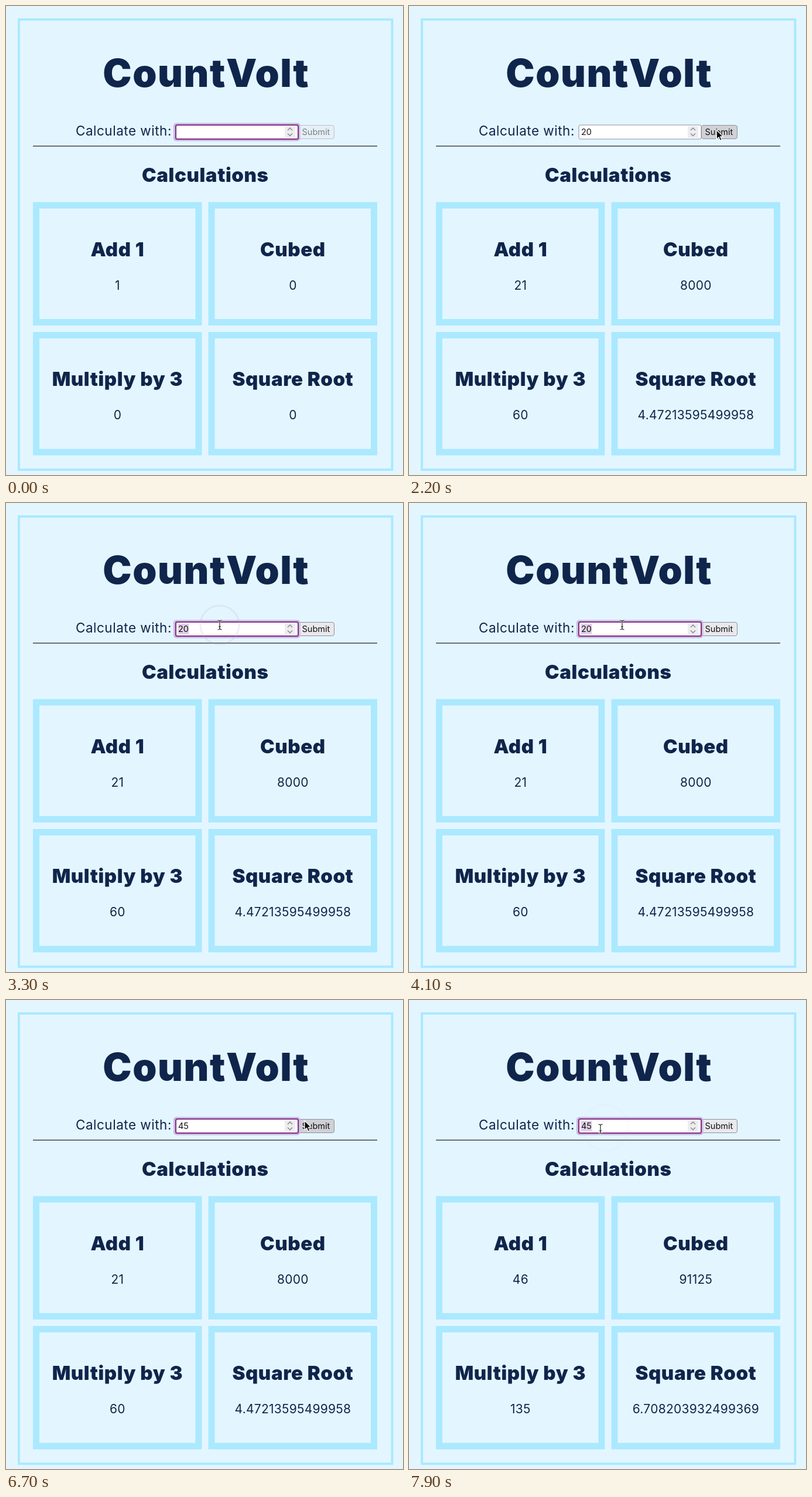
An HTML page that plays this animation: 678x800 px, repeating every 8000 ms.

```html
<!DOCTYPE html>
<html lang="en">
<head>
<meta charset="utf-8">
<title>CountVolt</title>
<style>
  html, body { margin: 0; width: 100%; height: 100%; overflow: hidden; background: #e3f6ff; }
  svg { display: block; width: 678px; height: 800px; }
  text { font-family: Inter, "Open Sans", sans-serif; fill: #10254b; }
  .head { font-weight: 900; font-size: 33px; letter-spacing: 0.6px; text-anchor: middle; }
  .title { font-size: 66px; letter-spacing: 1.6px; }
  .label { font-size: 22.5px; letter-spacing: 0.5px; }
  .value { font-size: 21px; letter-spacing: 0.25px; text-anchor: middle; }
  .field { font-size: 14.5px; fill: #111; }
  .frame { fill: none; stroke: #abe9ff; }
</style>
</head>
<body>
<svg id="stage" viewBox="0 0 678 800">
  <rect width="678" height="800" fill="#e3f6ff"/>
  <rect class="frame" x="22" y="23" width="637.5" height="768" stroke-width="4"/>
  <text class="head title" x="341.8" y="138">CountVolt</text>
  <text class="label" x="119" y="221">Calculate with:</text>
  <rect x="46" y="238" width="588" height="2" fill="#6d6f7a"/>
  <text class="head" x="340.3" y="300">Calculations</text>
  <g id="cards"></g>

  <g id="button">
    <rect id="face" x="499.5" y="203.5" width="61" height="23" rx="3.5" stroke="#8f8f9d"/>
    <text class="field" x="505.5" y="220">Submit</text>
  </g>
  <rect id="glow" x="286" y="199.5" width="216.5" height="31" rx="5" fill="#c9b9de"/>
  <rect id="input" x="290" y="203" width="209" height="24" rx="2.5" fill="#fff"/>
  <rect id="selection" x="294" y="206" width="18.5" height="18" fill="#e2d1e6"/>
  <text id="typed" class="field" x="294" y="220"></text>
  <rect id="caret" x="312.3" y="206" width="1.2" height="18" fill="#111"/>
  <rect x="476" y="205" width="18" height="20" fill="#ededf0"/>
  <path d="M481 212l4-4 4 4M481 217.5l4 4 4-4" fill="none" stroke="#88888f" stroke-width="1.5"/>

  <g id="rings" fill="none" stroke="#b58fd0" stroke-width="3"></g>
  <path id="arrow" d="M0 0V15.5L3.6 12.2 6.1 18 8.8 16.8 6.3 11.2H11Z" fill="#000" stroke="#fff" stroke-width="1.2"/>
  <g id="beam" fill="none">
    <path d="M-3.5 -8Q0 -8 0 -5.5Q0 -8 3.5 -8M0 -6V6M-3.5 8Q0 8 0 5.5Q0 8 3.5 8M-2 3H2" stroke="#fff" stroke-width="2.4"/>
    <path d="M-3.5 -8Q0 -8 0 -5.5Q0 -8 3.5 -8M0 -6V6M-3.5 8Q0 8 0 5.5Q0 8 3.5 8M-2 3H2" stroke="#111" stroke-width="1.1"/>
  </g>
</svg>
<script>
const LOOP = 8000, STEP = 100;
const $ = id => document.getElementById(id);
const set = (el, attrs) => { for (const k in attrs) el.setAttribute(k, attrs[k]); };
const show = (id, on) => set($(id), { visibility: on ? 'visible' : 'hidden' });

function add(parent, tag, attrs, text = '') {
  const el = document.createElementNS('http://www.w3.org/2000/svg', tag);
  set(el, attrs);
  el.textContent = text;
  return parent.appendChild(el);
}

const cards = [
  ['Add 1', n => n + 1],
  ['Cubed', n => n ** 3],
  ['Multiply by 3', n => n * 3],
  ['Square Root', Math.sqrt]
].map(([name, calc], i) => {
  const x = 46 + (i % 2) * 299.5, y = 334.5 + (i >> 1) * 221.5, mid = x + 144.4;
  add($('cards'), 'rect', { class: 'frame', x: x + 5.5, y: y + 5.5, width: 277.5, height: 199.5, 'stroke-width': 11 });
  add($('cards'), 'text', { class: 'head', x: mid, y: y + 92.3 }, name);
  return { calc, out: add($('cards'), 'text', { class: 'value', x: mid, y: y + 149.3 }) };
});

// Each entry holds from its time until the next one.
const typing = [[0, ''], [300, '2'], [500, '20'], [4900, '4'], [5000, '45']];
const results = [[0, 0], [1800, 20], [6900, 45]];
const focus = [[0, true], [1700, false], [2700, true], [6800, false], [7500, true]];
const selected = [[0, false], [3100, true], [4900, false], [7700, true]];
const at = (track, t) => track.filter(k => k[0] <= t).pop()[1];

const clicks = [[1700, 545, 212], [2800, 365, 208], [3000, 365, 208],
                [6800, 511, 207], [7500, 335, 218]];
const rings = clicks.map(([, cx, cy]) => add($('rings'), 'circle', { cx, cy }));

// Pointer is visible only inside these paths of [time, x, y].
const paths = [
  [[1200, 405, 214], [1500, 544, 212], [2100, 544, 212], [2600, 365, 208], [3600, 365, 208], [3900, 364, 208], [4900, 364, 208]],
  [[5500, 364, 208], [6200, 500, 207], [6600, 510, 206], [7100, 510, 206], [7500, 335, 218], [7900, 327, 220], [8000, 327, 220]]
];

function pointer(t) {
  const path = paths.find(p => t >= p[0][0] && t < p[p.length - 1][0]);
  if (!path) return null;
  const i = path.findIndex(k => k[0] > t), a = path[i - 1], b = path[i];
  const u = (t - a[0]) / (b[0] - a[0]), e = u * u * (3 - 2 * u);
  return [a[1] + (b[1] - a[1]) * e, a[2] + (b[2] - a[2]) * e];
}

function draw(t) {
  const text = at(typing, t), focused = at(focus, t), marked = at(selected, t);
  $('typed').textContent = text;
  for (const c of cards) c.out.textContent = c.calc(at(results, t));

  show('glow', focused);
  set($('input'), { stroke: focused ? '#832d85' : '#8f8f9d', 'stroke-width': focused ? 2 : 1 });
  show('selection', marked);

  // The caret blinks from the last key press or click.
  const since = Math.max(...[300, 500, 2800, 4900, 5000].filter(k => k <= t), 0);
  show('caret', focused && !marked && text && (t - since) % 1000 < 500);
  set($('caret'), { x: 294 + text.length * 9.15 });

  const p = pointer(t);
  const over = p && p[0] >= 500 && p[0] <= 560;
  const pressed = clicks.some(([s, x]) => x > 500 && t >= s && t < s + 100);
  set($('face'), { fill: pressed ? '#b1b1b9' : over ? '#d0d0d7' : '#e9e9ed' });
  set($('button'), { opacity: text ? 1 : 0.5 });

  const inField = p && p[0] > 289 && p[0] < 476;
  show('arrow', p && !inField);
  show('beam', inField);
  if (p) for (const id of ['arrow', 'beam']) set($(id), { transform: `translate(${p[0]} ${p[1]})` });

  clicks.forEach(([s], i) => {
    const u = (t - s) / 400, on = u >= 0 && u <= 1;
    set(rings[i], { r: on ? 15 + 24 * u : 0, opacity: on ? 0.04 + 0.5 * (1 - u) : 0 });
  });
}

const start = performance.now();
function tick() {
  const t = (performance.now() - start) % LOOP;
  draw(Math.floor(t / STEP) * STEP);
  requestAnimationFrame(tick);
}
tick();
</script>
</body>
</html>
```
